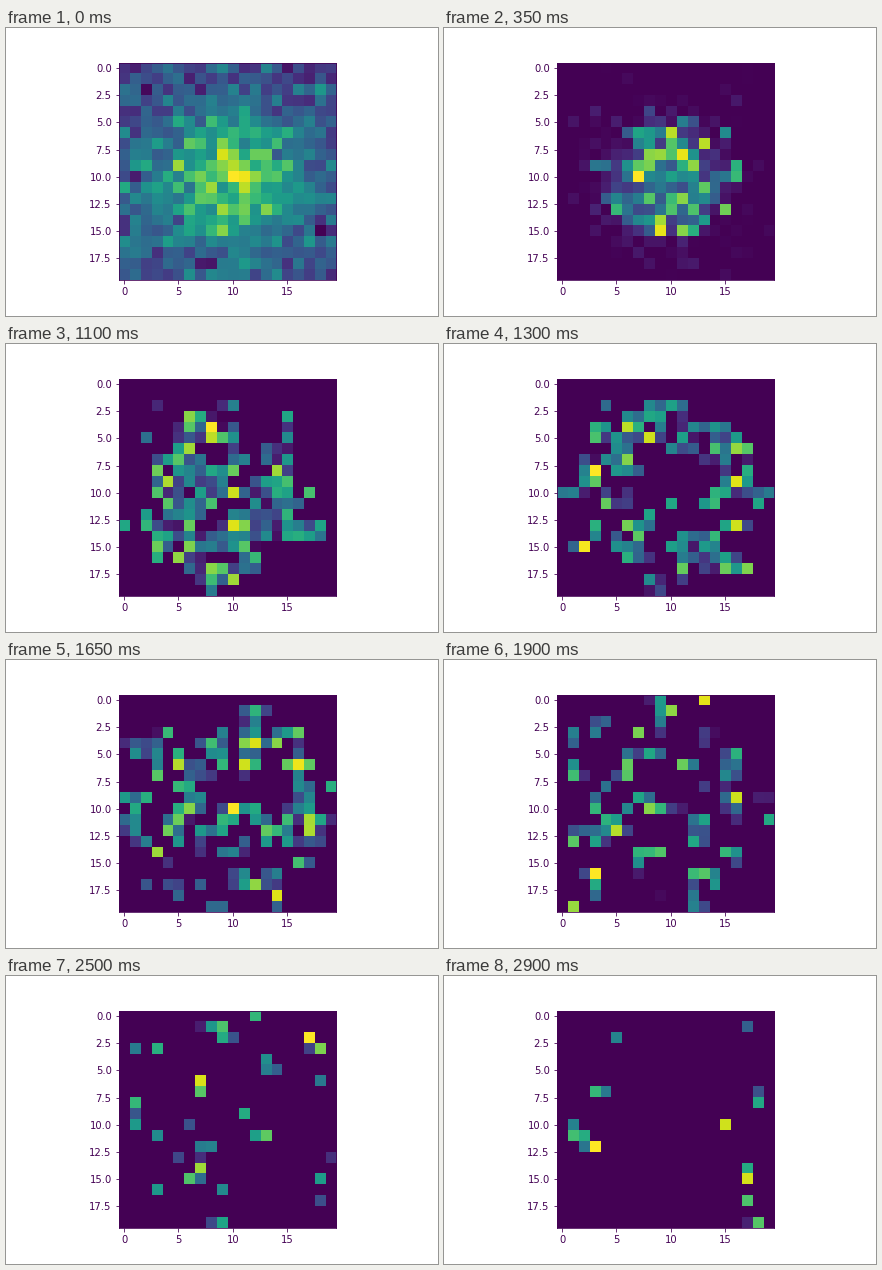
A matplotlib script for the animation above (2.95 s loop, 432x288 px).

```python
import matplotlib.pyplot as plt
import numpy as np
from matplotlib.animation import FuncAnimation

FRAMES, STEP_MS, N = 59, 50, 20
SETTLED = 11          # step at which the noisy blob has become a patchy disc
KEEP = 0.4            # share of cells that keep their draw from step to step
INK = plt.get_cmap("viridis")(0.0)

rng = np.random.default_rng(5)
rows, cols = np.mgrid[:N, :N]
radius = np.hypot(rows - 10.3, cols - 9.2)
blob = np.exp(-((rows - 10.5) ** 2 + (cols - 9.8) ** 2) / (2 * 4.6 ** 2))


def sigmoid(x):
    return 1 / (1 + np.exp(-x))


def draw():
    return rng.normal(size=(N, N)), rng.beta(1.6, 2.3, (N, N))


def clumped_rank(noise):
    """Uniform ranks in 0..1 that lean towards those of neighbouring cells."""
    near = sum(np.roll(noise, s, axis) for s in (-1, 1) for axis in (0, 1))
    mixed = (noise + 0.3 * near).ravel()
    return (mixed.argsort().argsort() / mixed.size).reshape(N, N)


def occupancy(i):
    """A disc that widens and thins out, hollow for a while midway."""
    outer = 4 + 0.17 * i
    hollow = 5 * np.exp(-((i - 27) / 5) ** 2) - 1
    density = 1.05 * sigmoid((30 - i) / 9)
    ring = 1 - 0.85 * sigmoid((hollow - radius) / 0.5)
    return density * ring * sigmoid((outer - radius) / 0.55)


def simulate():
    noise, level = draw()
    states = []
    for i in range(FRAMES):
        if i:
            fresh = rng.random((N, N)) > KEEP
            new_noise, new_level = draw()
            noise = np.where(fresh, new_noise, noise)
            level = np.where(fresh, new_level, level)
        field = np.where(clumped_rank(noise) < occupancy(i), level, 0)
        if i < SETTLED:
            w = i / SETTLED
            start = 0.24 + 0.42 * blob + 0.085 * noise
            field = (1 - w) * np.clip(start - 0.6 * w, 0, None) + w * field
        states.append(field)
    return states


states = simulate()

plt.rcParams.update({"font.family": "DejaVu Sans", "font.size": 10})
fig = plt.figure(figsize=(6, 4), dpi=72, facecolor="white")
ax = fig.add_axes([0.125, 0.125, 0.775, 0.755])
image = ax.imshow(states[0], cmap="viridis", interpolation="nearest")
ax.set_xticks(range(0, N, 5))
ax.set_yticks(np.arange(0, N, 2.5))
ax.yaxis.set_major_formatter("{x:.1f}")
ax.tick_params(color=INK, labelcolor=INK)
for spine in ax.spines.values():
    spine.set_color(INK)


def update(i):
    field = states[i]
    image.set_data(field)
    image.set_clim(field.min(), field.max())
    return [image]


anim = FuncAnimation(fig, update, frames=FRAMES, interval=STEP_MS,
                     repeat=True, repeat_delay=0, blit=False)
plt.show()
```
